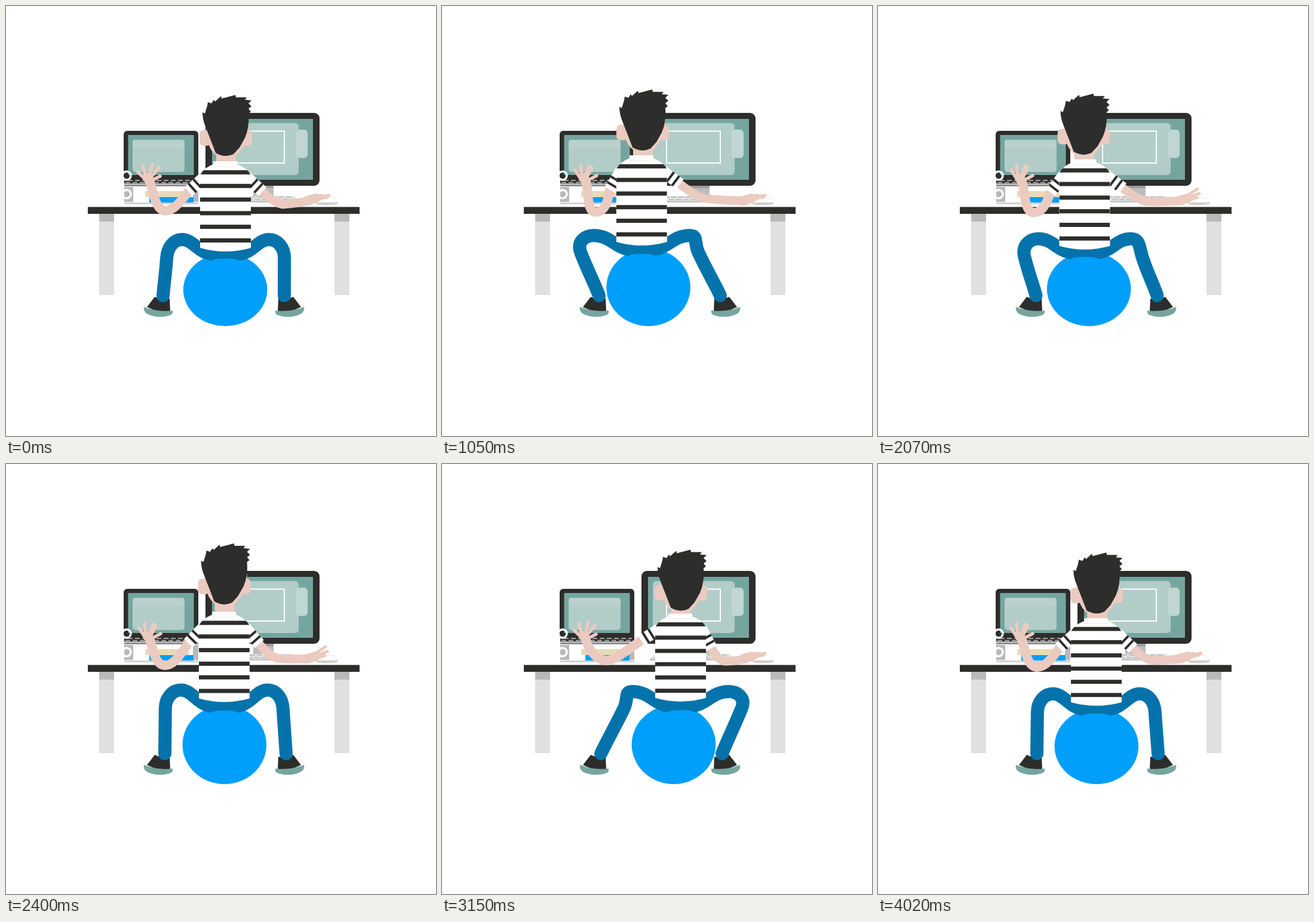
An HTML page for the animation above (4.05 s loop, 720 by 720 pixels).

```html
<!DOCTYPE html>
<html lang="en">
<head>
<meta charset="utf-8">
<title>Bouncing at the desk</title>
<style>
  html, body { margin: 0; width: 100%; height: 100%; overflow: hidden; background: #fff; }
  svg { display: block; width: 100vw; height: 100vh; }
  .ink { fill: #2d2d2c; }
  .teal { fill: #76a5a0; }
  .pane { fill: #b2ccc8; }
  .skin { fill: #ebcac0; }
  .limb { fill: none; stroke: #ebcac0; stroke-linecap: round; stroke-linejoin: round; }
  .leg { fill: none; stroke: #0573ab; stroke-width: 22; stroke-linecap: round; }
  .cloth { stroke: #fff; stroke-width: 20; }
  .band { stroke: #2d2d2c; stroke-width: 20; stroke-dasharray: 0 15 4 7 4 99; }
  .ring { fill: none; stroke: #fff; stroke-width: 3.5; }
</style>
</head>
<body>
<svg viewBox="0 0 720 720">
  <defs>
    <clipPath id="shirtClip"><use href="#shirt"/></clipPath>
    <clipPath id="cupClip"><rect x="197" y="270" width="40" height="60"/></clipPath>
    <g id="shoe">
      <path d="M231 503Q234 484 250 485L262 497L244 510Z" fill="#fff" stroke="#eee" stroke-width=".6"/>
      <path class="ink" d="M249 487L262 492L274 490L275 512L252 511L236 504Z"/>
      <path class="teal" d="M231 504Q255 513 279 510Q280 516 274 518Q258 523 242 518Q229 514 231 504Z"/>
    </g>
    <g id="deskLeg">
      <rect x="156" y="348" width="25" height="136" fill="#e0e0e0"/>
      <rect x="156" y="348" width="25" height="13" fill="#b9b9b9"/>
    </g>
  </defs>

  <use href="#deskLeg"/>
  <use href="#deskLeg" x="394"/>
  <rect class="ink" x="137" y="336.500" width="455" height="11.500"/>

  <g id="laptop">
    <rect class="ink" x="197" y="209" width="125" height="84" rx="6"/>
    <rect class="teal" x="204.500" y="216" width="110" height="67"/>
    <rect class="pane" x="212" y="224" width="87" height="54" rx="5"/>
    <path d="M212 237.500V229Q212 224 217 224H294Q299 224 299 229V237.500Z" fill="#b9d1cd"/>
    <rect class="ink" x="198" y="288" width="124" height="9.500"/>
    <path d="M204 292H318M200 295.500H320" stroke="#c9c9c9" stroke-width="1.300" stroke-dasharray="8 4"/>
    <rect x="198" y="297.500" width="124" height="1.500" fill="#d6d6d6"/>
    <rect x="198" y="299" width="124" height="3" fill="#8f8f8f"/>
    <rect x="198" y="303" width="15" height="25" fill="#b9b9b9"/>
    <rect x="313" y="303" width="9" height="25" fill="#b9b9b9"/>
    <rect x="233" y="310" width="73" height="10" fill="#e8dab7"/>
    <rect x="240" y="320" width="74" height="10" fill="#009ffb"/>
    <rect x="198" y="329" width="124" height="3" fill="#d2d2d2"/>
    <g clip-path="url(#cupClip)">
      <circle class="ring" cx="202" cy="284" r="7"/>
      <circle class="ring" cx="202" cy="315" r="7"/>
    </g>
  </g>

  <g id="monitor">
    <rect x="414" y="300" width="34" height="20" fill="#bcbcbc"/>
    <rect x="414" y="300" width="34" height="5" fill="#9d9d9d"/>
    <rect class="ink" x="334" y="179" width="191" height="122" rx="9"/>
    <rect class="teal" x="345" y="189" width="169" height="102"/>
    <rect class="pane" x="353" y="196" width="137" height="87" rx="6"/>
    <rect x="376" y="209.500" width="90" height="53.500" fill="none" stroke="#fff" stroke-width="2"/>
    <rect x="485" y="207" width="20" height="47.500" rx="6" fill="#c0d6d2"/>
    <path d="M358 318H482L490 326H348Z" fill="#e3e3e3"/>
    <path d="M360 320H480M356 324H486" stroke="#b5b5b5" stroke-width="1.500" stroke-dasharray="9 3"/>
    <path d="M348 326H490V329H348Z" fill="#c6c6c6"/>
    <ellipse cx="537" cy="330" rx="19" ry="3.500" fill="#d3cec9"/>
    <path d="M519 329Q524 320 542 320Q555 321 555 329Z" fill="#fff" stroke="#ddd" stroke-width=".7"/>
  </g>

  <use href="#shoe"/>
  <use href="#shoe" transform="translate(730) scale(-1 1)"/>
  <ellipse id="ball" rx="70.300" fill="#009ffb"/>
  <path id="legL" class="leg"/>
  <path id="legR" class="leg"/>
  <path id="seat" fill="#0573ab"/>

  <g id="head">
    <rect class="skin" x="324" y="208" width="19" height="26" rx="7"/>
    <rect class="skin" x="393" y="208" width="19" height="26" rx="7"/>
    <path class="skin" d="M335 200H406Q406 231 385 251V268H352V250Q338 240 336 215Z"/>
    <path class="ink" d="M329 178L333 180L337 167L338 161L344 163L348 157L350 160L360 151L361 155L384 149L385 153L403 153L400 157L411 158L406 163L411 168L406 172L410 177L406 180Q408 203 400 221L391 237L381 248Q366 255 351 246L348 238L334 202Q329 190 329 178Z"/>
  </g>

  <g id="armL">
    <path class="limb" stroke-width="15.500"/>
    <line class="cloth"/><line class="band"/>
  </g>
  <path class="limb" d="M237 287L241 295" stroke-width="16"/>
  <path id="fingersL" class="limb" stroke-width="5.500"/>

  <g id="armR">
    <path class="limb" stroke-width="14.500"/>
    <line class="cloth"/><line class="band"/>
  </g>
  <path class="skin" d="M500 319L518 314L532 318L527 326L508 334H498Z"/>
  <path id="fingersR" class="limb" stroke-width="5"/>

  <g id="torso">
    <path id="shirt" fill="#fff" d="M0-6V-128Q6-140 22-146V-151H62V-146Q79-140 85-128V-6Q42.500 6 0-6Z"/>
    <path d="M22-142H62" stroke="#e4e4e4" stroke-width=".8"/>
    <g id="stripes" clip-path="url(#shirtClip)"></g>
  </g>
</svg>
<script>
const LOOP = 4050, STEP = 30;
const $ = id => document.getElementById(id);

// Each row: time in ms, value.
const hipY = [[0,411],[253,379],[506,404],[759,379],[1012,402],[1280,380],[1520,410],[1800,380],
  [2035,409],[2270,386],[2530,411],[2775,386],[3040,405],[3290,387],[3540,405],[3790,388],[4040,405]];
const sway = [[0,325],[590,324.5],[1130,290],[1700,289],[1780,289],[2420,323],[2500,324],[3080,357],[3450,357],[4030,323]];
const squash = [[2650,1],[3120,.975],[3800,.97]];
const footShift = [[1800,0],[2350,3]];
const lift = [[1400,0],[1600,1],[2450,1],[2650,0]];
const spread = [[0,0],[500,1],[1200,1],[1650,1.4],[2200,1],[2500,1],[3000,0],[3400,0],[3900,1]];

function at(keys, t) {
  if (t <= keys[0][0]) return keys[0][1];
  for (let i = 1; i < keys.length; i++) {
    const [t0, a] = keys[i - 1], [t1, b] = keys[i];
    if (t < t1) return a + (b - a) * (1 - Math.cos(Math.PI * (t - t0) / (t1 - t0))) / 2;
  }
  return keys[keys.length - 1][1];
}

const set = (el, attrs) => { for (const k in attrs) el.setAttribute(k, attrs[k]); };

for (let i = 0; i < 6; i++) {
  const r = document.createElementNS('http://www.w3.org/2000/svg', 'rect');
  set(r, { class: 'ink', y: -136 + 22.8 * i, width: 85, height: 7 });
  $('stripes').append(r);
}

// side is -1 for the left leg and 1 for the right one
function leg(el, side, hipX, y, hipLow, lean, foot) {
  const top = hipX + side * (30 + Math.abs(lean) * .25);
  const topY = y - 20 + Math.abs(lean) * .1;
  const knee = hipX + side * 56 + lean * .12;
  const dx = foot - knee;
  set(el, { d: `M${hipX - side * 18} ${hipLow - 10}C${hipX + side * 4} ${y + 1} ${hipX + side * 12} ${topY} ${top} ${topY}
    C${top + side * 14} ${topY} ${knee - dx * .2} ${y - 7} ${knee} ${y + 11}
    C${knee + dx * .4} ${y + 43} ${foot - dx * .2} 468 ${foot} 485` });
}

function arm(group, sx, sy, ex, ey, tail) {
  const len = Math.hypot(ex - sx, ey - sy);
  const cx = sx + (ex - sx) / len * 37, cy = sy + (ey - sy) / len * 37;
  const [skin, cloth, band] = group.children;
  set(skin, { d: `M${sx} ${sy}L${cx} ${cy}${tail(ex, ey)}` });
  for (const l of [cloth, band]) set(l, { x1: sx, y1: sy, x2: cx, y2: cy });
}

// Fingers from roots to tips, blended between two poses.
function fingers(el, list, k) {
  set(el, { d: list.map(([x, y, ax, ay, bx, by]) =>
    `M${x} ${y}L${ax + (bx - ax) * k} ${ay + (by - ay) * k}`).join('') });
}
const left = [[232,289,221,278,223,275], [234,285,229,267,232,267], [240,284,245,265,247,268],
  [242,288,256,270,251,271], [244,292,258,285,259,284]];
const right = [[514,320,529,317,535,306], [518,321,541,317,538,314], [516,324,538,320,534,321]];

function draw(t) {
  const x = at(sway, t), y = at(hipY, t), k = at(squash, t);
  const lean = x - 324, rise = y - 405, foot = at(footShift, t);
  const lag = Math.max(0, t - 23);

  const top = 395 + (y - 387) * .8, low = top + 11;
  set($('ball'), { cx: 366.5 + lean * .65, cy: (top + 536) / 2, ry: (536 - top) / 2 });
  leg($('legL'), -1, x, y, low, lean, 263 + foot);
  leg($('legR'), 1, x + 85, y, low, lean, 466 + foot);
  set($('seat'), { d: `M${x} ${y - 18}h85V${y}Q${x + 80} ${low - 5} ${x + 71} ${low}
    Q${x + 43} ${low - 5} ${x + 15} ${low}Q${x + 5} ${low - 5} ${x} ${y}Z` });

  const hairY = at(hipY, lag) - 262 + (1 - k) * 215;
  set($('head'), { transform: `translate(${at(sway, lag) - 325} ${hairY - 149})` });

  const shoulder = y - 125 * k;
  arm($('armL'), x + 8, shoulder, 268 + lean * .3, 341 + rise * .5 - lean * .22,
    (ex, ey) => `C${ex + 18} ${ey - 8} ${ex + 10} ${ey - 2} ${ex} ${ey - 1}C${ex - 17} ${ey} 247 315 241 294`);
  arm($('armR'), x + 77, shoulder, 447 + rise * .45 + lean * .55, 327 + rise * .5 + lean * .15,
    (ex, ey) => `Q${ex} ${ey} ${ex + 12} ${ey + 2}Q${(ex + 520) / 2} ${(ey + 332) / 2} 508 326`);
  fingers($('fingersL'), left, at(spread, t));
  fingers($('fingersR'), right, at(lift, t));

  set($('torso'), { transform: `translate(${x} ${y}) scale(1 ${k})` });
}

const start = performance.now();
function tick() {
  const t = (performance.now() - start) % LOOP;
  draw(Math.floor(t / STEP) * STEP);
  requestAnimationFrame(tick);
}
draw(0);
requestAnimationFrame(tick);
</script>
</body>
</html>
```
